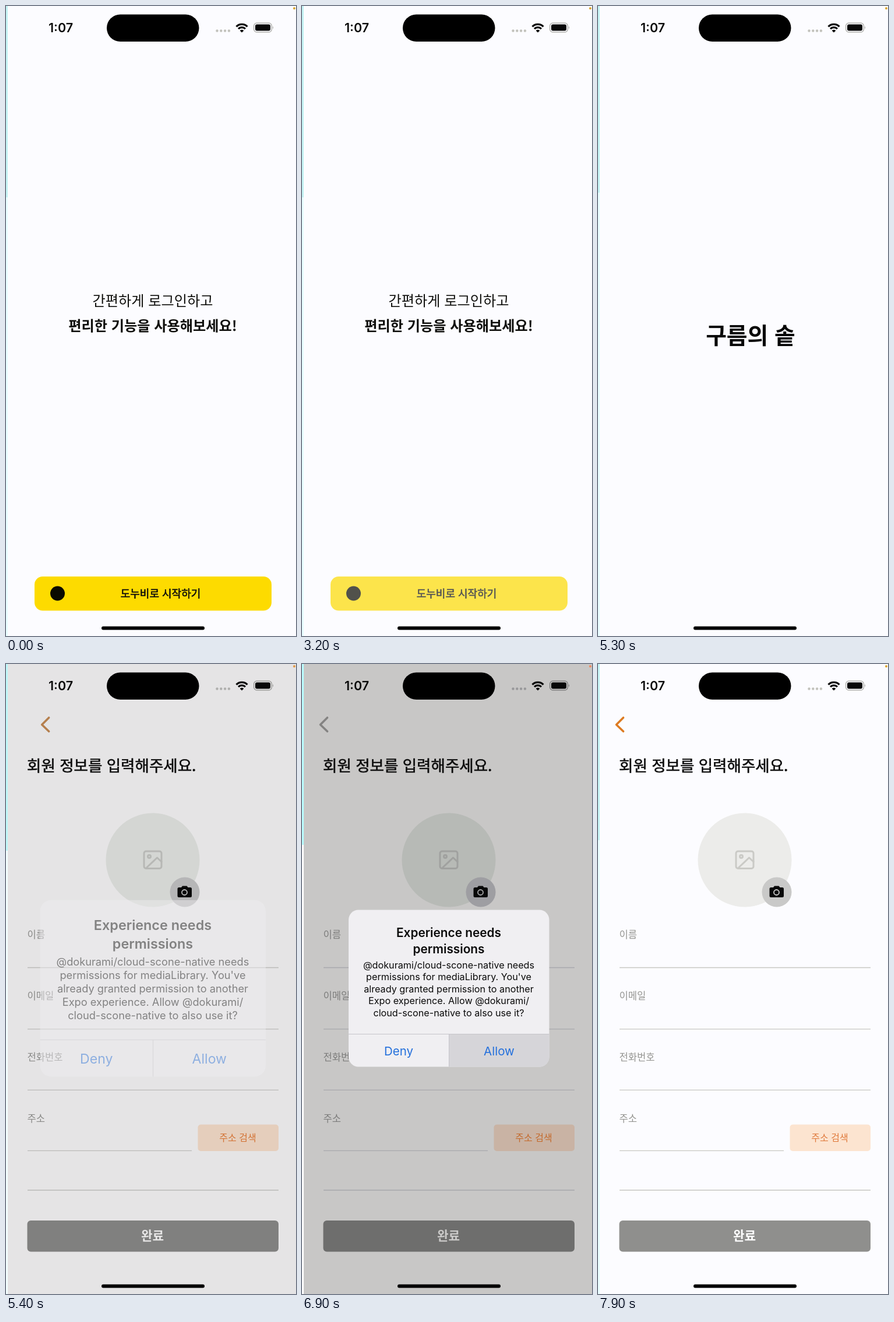
These frames come from a looping animation (498 by 1080 pixels, 8000 ms). An HTML page:

```html
<!DOCTYPE html>
<html lang="ko">
<head>
<meta charset="utf-8">
<style>
html, body { margin: 0; width: 100%; height: 100%; overflow: hidden; background: #fcfcff; }
svg { display: block; width: 498px; height: 1080px; }
text { font-family: "Noto Sans CJK KR", "Noto Sans CJK", "Noto Sans CJK JP", sans-serif; }
.ui, .ui text { font-family: Inter, sans-serif; }
.mid { text-anchor: middle; }
.medium { stroke: #0c0c0c; stroke-width: 0.6; }
.line { fill: none; stroke-linecap: round; stroke-linejoin: round; }
</style>
</head>
<body>
<svg viewBox="0 0 498 1080" xmlns="http://www.w3.org/2000/svg">
  <rect id="base" width="498" height="1080"/>

  <g id="login" class="mid" fill="#0f0f0c">
    <text x="252" y="513.5" font-size="24.2">간편하게 로그인하고</text>
    <text x="252" y="557" font-size="24.2" font-weight="700">편리한 기능을 사용해보세요!</text>
    <g id="start">
      <rect x="49" y="978" width="407" height="58.5" rx="14" fill="#fddb00"/>
      <circle cx="88.5" cy="1007" r="12.5" fill="#0a0a00"/>
      <text class="medium" x="265.5" y="1013.5" font-size="18">도누비로 시작하기</text>
    </g>
  </g>

  <text id="home" class="mid" x="262" y="579" font-size="38.8" font-weight="700" fill="#080808">구름의 솥</text>

  <g id="form">
    <path id="back" class="line" d="M43.5 92 31.5 104 43.5 115.5" stroke-width="3.6"/>
    <text class="medium" x="36" y="184" font-size="26.5" fill="#0c0c0c">회원 정보를 입력해주세요.</text>
    <circle id="avatar" cx="252" cy="336" r="80.5"/>
    <g id="photo" class="line" stroke-width="3">
      <rect x="237" y="321" width="30" height="29.5" rx="3.5"/>
      <circle cx="246" cy="330" r="2.5"/>
      <path d="M241 349.5 259.5 332 267 339"/>
    </g>
    <circle id="badge" cx="307" cy="391" r="25.5"/>
    <path d="M297 383h4l2-2.5h7.5l2 2.5h4q2.5 0 2.5 2.5v12q0 2.500-2.500 2.500h-19.500q-2.500 0-2.500-2.500v-12q0-2.500 2.500-2.500z" fill="#080808"/>
    <circle id="lens" class="line" cx="306.5" cy="391.5" r="4.5" stroke-width="1.8"/>
    <g id="labels" font-size="16.6">
      <text x="36.5" y="470">이름</text>
      <text x="36.5" y="575">이메일</text>
      <text x="36.5" y="680">전화번호</text>
      <text x="36.5" y="785">주소</text>
    </g>
    <path id="rules" d="M37 520.5H468M37 625.8H468M37 730.3H468M37 834.3H319M37 902H468" stroke-width="1.3"/>
    <rect id="search" x="329.5" y="789.5" width="138.5" height="45.5" rx="5"/>
    <text id="searchText" class="mid" x="398" y="817.5" font-size="16" font-weight="500">주소 검색</text>
    <rect id="done" x="36.5" y="954" width="431.5" height="53.5" rx="6"/>
    <text id="doneText" class="mid" x="251.5" y="988" font-size="21.3" font-weight="700">완료</text>
  </g>

  <g id="alert" class="ui mid" fill="#0a0a0a">
    <rect x="80" y="421.5" width="344.5" height="269" rx="17" fill="#f0eff2"/>
    <path id="pressed" d="M252.5 634.5h172v39a17 17 0 0 1-17 17h-155z" fill="#d6d5d9"/>
    <path d="M80 634.5H424.5M252.5 634.5V690.5" stroke="#c6c5ca" stroke-width="1"/>
    <g font-size="20.8" font-weight="600">
      <text x="252" y="467.5">Experience needs</text>
      <text x="252" y="495.5">permissions</text>
    </g>
    <g font-size="16.2">
      <text x="252" y="521.5">@dokurami/cloud-scone-native needs</text>
      <text x="252" y="542">permissions for mediaLibrary. You've</text>
      <text x="252" y="562.5">already granted permission to another</text>
      <text x="252" y="583">Expo experience. Allow @dokurami/</text>
      <text x="252" y="603.5">cloud-scone-native to also use it?</text>
    </g>
    <g font-size="20.5" fill="#2470dc">
      <text x="166" y="671">Deny</text>
      <text x="338.5" y="671">Allow</text>
    </g>
  </g>

  <rect id="edge" width="3" height="1080"/>
  <rect id="edgeTop" width="3"/>
  <rect x="173" y="14.5" width="158.5" height="46.5" rx="23.25"/>
  <text class="ui" x="73" y="45" font-size="21.5" font-weight="600" fill="#0a0a0a">1:07</text>
  <g id="signal">
    <circle cx="362.5" cy="42.5" r="2.2"/><circle cx="369.3" cy="42.5" r="2.2"/>
    <circle cx="376.1" cy="42.5" r="2.2"/><circle cx="382.9" cy="42.5" r="2.2"/>
  </g>
  <g fill="none" stroke="#080808" stroke-width="3.2">
    <path d="M395.5 35.3a13.4 13.4 0 0 1 19 0"/>
    <path d="M399 39.2a8.5 8.5 0 0 1 12 0"/>
  </g>
  <path d="M405 45.5 401.7 42.2a4.7 4.7 0 0 1 6.6 0z" fill="#080808"/>
  <rect id="cell" x="425.7" y="29.2" width="30.6" height="15.6" rx="5" fill="none" stroke-width="1.3"/>
  <rect x="428" y="31.4" width="26" height="11.2" rx="3" fill="#080808"/>
  <path id="cap" d="M458 34.5q2 2.5 0 5z"/>
  <rect x="164" y="1063.5" width="177" height="6" rx="3"/>
  <circle id="dot" cx="495" cy="4" r="2"/>
</svg>
<script>
const LOOP = 8000;
const el = {};
document.querySelectorAll("[id]").forEach(n => el[n.id] = n);

const ramp = (t, a, b) => Math.min(1, Math.max(0, (t - a) / (b - a)));
const show = (n, on) => n.setAttribute("visibility", on ? "visible" : "hidden");
const fade = (n, v) => n.setAttribute("opacity", v);
const rgb = hex => [1, 3, 5].map(i => parseInt(hex.slice(i, i + 2), 16));

function mix(a, b, p) {
  const end = rgb(b);
  return `rgb(${rgb(a).map((v, i) => Math.round(v + (end[i] - v) * p))})`;
}

// id, attribute, plain colour, colour behind the alert
const tints = [
  ["base", "fill", "#fcfcff", "#c8c7c6"],
  ["back", "stroke", "#dd7b22", "#848382"],
  ["avatar", "fill", "#ececea", "#b7bab6"],
  ["photo", "stroke", "#cacac6", "#a0a19f"],
  ["badge", "fill", "#c9c9c8", "#9e9ea2"],
  ["lens", "stroke", "#c9c9c8", "#a5a5a7"],
  ["labels", "fill", "#949490", "#7c7c7b"],
  ["rules", "stroke", "#c8c8c2", "#a8a8ac"],
  ["search", "fill", "#fce4d0", "#c9b3a4"],
  ["searchText", "fill", "#e07a3c", "#c46a2c"],
  ["done", "fill", "#8f8f8d", "#6e6e6d"],
  ["doneText", "fill", "#ffffff", "#cbcac9"],
  ["signal", "fill", "#c2c2bc", "#98989a"],
  ["cell", "stroke", "#a6a6a2", "#767676"],
  ["cap", "fill", "#a6a6a2", "#767676"],
  ["edge", "fill", "#e8fdff", "#ffffff"],
  ["edgeTop", "fill", "#c4f3f4", "#b9fcff"],
  ["dot", "fill", "#d9a32c", "#f08a60"]
];

function draw(t) {
  const homeOn = t >= 4300, formOn = t >= 5350;
  show(el.login, !homeOn);
  show(el.home, homeOn && !formOn);
  show(el.form, formOn);
  fade(el.start, 1 - 0.3 * (ramp(t, 2950, 3100) - ramp(t, 3350, 3600)));

  const rest = 1 - ramp(t, 5340, 5680);
  const dim = (1 - rest ** 3) * (1 - ramp(t, 7080, 7330));
  for (const [id, attr, a, b] of tints) el[id].setAttribute(attr, mix(a, b, dim));

  const slide = formOn ? 8 * Math.exp((5600 - t) / 150) : 0;
  el.back.setAttribute("transform", `translate(${slide} 0)`);

  const scale = 1 + 0.2 * rest ** 2.4;
  el.alert.setAttribute("transform",
    `translate(252.25 556) scale(${scale}) translate(-252.25 -556)`);
  show(el.alert, dim > 0);
  fade(el.alert, dim);
  show(el.pressed, t >= 6800);

  const edge = t < 5000 ? 328 : t < 6200 ? 320 : t < 7500 ? 310 : 302;
  el.edgeTop.setAttribute("height", edge);
}

const begin = performance.now();
function tick() {
  draw((performance.now() - begin) % LOOP);
  requestAnimationFrame(tick);
}
tick();
</script>
</body>
</html>
```
